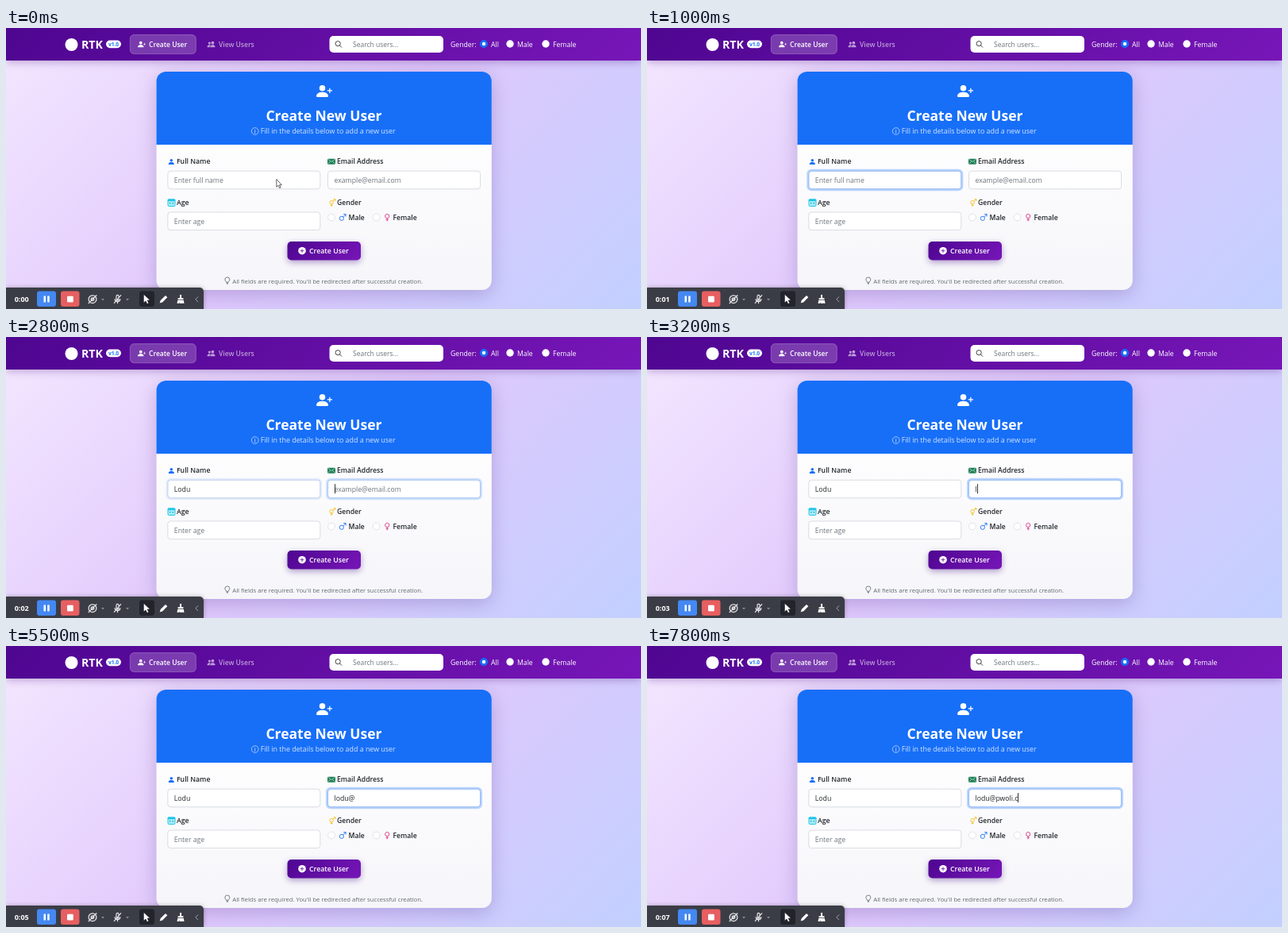
An HTML page with a canvas for the animation above (8 s loop, 800 by 354 pixels).

```html
<!DOCTYPE html>
<html lang="en">
<head>
<meta charset="utf-8">
<title>Create New User</title>
<style>
html, body { margin: 0; width: 100%; height: 100%; overflow: hidden; }
canvas { display: block; width: 800px; height: 354px; }
</style>
</head>
<body>
<canvas id="stage" width="800" height="354"></canvas>
<script>
const ctx = document.getElementById('stage').getContext('2d');
const LOOP = 8000;
const FOCUS_NAME = 300, FOCUS_MAIL = 2700;
const NAME = 'Lodu', MAIL = 'lodu@pwoli.c';
const INK = '#212529', GREY = '#6c757d', BLUE = '#176ff8', WHITE = '#fff';

// [time, characters typed, caret visible]
const nameKeys = [[300, 0, 1], [800, 0, 0], [1300, 0, 1], [1400, 1, 1], [1600, 2, 1],
  [2000, 2, 0], [2200, 3, 1], [2400, 4, 1], [2700, 4, 0]];
const mailKeys = [[2700, 0, 1], [3200, 1, 1], [3500, 2, 1], [3800, 3, 1], [4000, 3, 0],
  [4300, 4, 1], [4800, 4, 0], [5000, 5, 1], [5500, 5, 0], [6000, 5, 1], [6400, 6, 1],
  [6600, 7, 1], [6700, 8, 1], [6900, 9, 1], [7200, 10, 1], [7400, 11, 1], [7800, 12, 1]];

// Icons on a 16 unit grid
const HEAD = 'a3 3 0 1 0 0-6 3 3 0 0 0 0 6';
const ICONS = {
  person: 'M3 14s-1 0-1-1 1-4 6-4 6 3 6 4-1 1-1 1zm5-6' + HEAD,
  personPlus: 'M1 14s-1 0-1-1 1-4 6-4 6 3 6 4-1 1-1 1zm5-6' + HEAD +
    'M13 5h1v2h2v1h-2v2h-1v-2h-2v-1h2z',
  people: 'M7 14s-1 0-1-1 1-4 5-4 5 3 5 4-1 1-1 1zm4-6' + HEAD +
    'm-5.8 6A2.2 2.2 0 0 1 5 13c0-1.4.7-2.8 1.9-3.7A6 6 0 0 0 5 9c-4 0-5 3-5 4s1 1 1 1z' +
    'M4.5 8a2.5 2.5 0 1 0 0-5 2.5 2.5 0 0 0 0 5',
  search: 'M12 6.5a5.5 5.5 0 1 1-11 0 5.5 5.5 0 0 1 11 0M10.5 10.5L15.2 15.2',
  info: 'M15.5 8a7.5 7.5 0 1 1-15 0 7.5 7.5 0 0 1 15 0M8 4v1.6M6.8 7.2h1.4L7.6 12h1.4',
  male: 'M10.5 10a4.5 4.5 0 1 1-9 0 4.5 4.5 0 0 1 9 0M9.2 6.8L15 1M10 1h5v5',
  female: 'M12.5 5.2a4.5 4.5 0 1 1-9 0 4.5 4.5 0 0 1 9 0M8 9.7V16M5.3 13h5.4',
  both: 'M10.5 7.5a3.7 3.7 0 1 1-7.4 0 3.7 3.7 0 0 1 7.4 0M9.5 5L15 .8M11 .8h4v4M6.8 11.2V16M4.5 13.6h4.6',
  bulb: 'M5.5 11.5C5.5 9.5 3 8.800 3 5.800a5 5 0 0 1 10 0c0 3-2.500 3.700-2.500 5.700zM6 13.500h4M7 15.500h2',
  camera: 'M14.500 8a6.500 6.500 0 1 1-13 0 6.500 6.500 0 0 1 13 0M10.500 8a2.500 2.500 0 1 1-5 0 2.500 2.500 0 0 1 5 0M1 15L15 1',
  mic: 'M6 3a2 2 0 0 1 4 0v5a2 2 0 0 1-4 0zM3.500 7.500a4.500 4.500 0 0 0 9 0M8 12v3.500M2 15L14 1',
  arrow: 'M3 0v13.500l3.300-3 2.500 5.300 2.200-1-2.500-5.200H13z',
  pencil: 'M11.500 1l3.500 3.500L6 13.500 1 15l1.500-5z',
  stamp: 'M6.500 0h3v6h3.500v3h-10V6h3.500zM2.500 10h11l1 6h-3l-.5-3v3H6.500v-3L5.500 16h-4z',
};

function text(str, x, y, size, color, weight = 400, align = 'left') {
  ctx.font = `${weight} ${size}px "Open Sans", "Noto Sans", sans-serif`;
  ctx.textAlign = align;
  ctx.fillStyle = color;
  ctx.fillText(str, x, y);
}

function box(x, y, w, h, r, fill, stroke, line = 0.7) {
  ctx.beginPath();
  ctx.roundRect(x, y, w, h, r);
  if (fill) { ctx.fillStyle = fill; ctx.fill(); }
  if (stroke) { ctx.strokeStyle = stroke; ctx.lineWidth = line; ctx.stroke(); }
}

function disc(x, y, r, fill, stroke) {
  box(x - r, y - r, 2 * r, 2 * r, r, fill, stroke);
}

// Icon centred on x, y; a line width draws it as an outline
function icon(name, x, y, size, color, line) {
  ctx.save();
  ctx.translate(x - size / 2, y - size / 2);
  ctx.scale(size / 16, size / 16);
  const path = new Path2D(ICONS[name]);
  if (line) {
    ctx.strokeStyle = color;
    ctx.lineWidth = line;
    ctx.stroke(path);
  } else {
    ctx.fillStyle = color;
    ctx.fill(path);
  }
  ctx.restore();
}

// Gradient running at 135 degrees over a box
function diagonal(x, y, w, h, ...colors) {
  const d = (w + h) / 4, cx = x + w / 2, cy = y + h / 2;
  const g = ctx.createLinearGradient(cx - d, cy - d, cx + d, cy + d);
  colors.forEach((c, i) => g.addColorStop(i / (colors.length - 1), c));
  return g;
}

function withShadow(color, blur, dy, draw) {
  ctx.save();
  ctx.shadowColor = color;
  ctx.shadowBlur = blur;
  ctx.shadowOffsetY = dy;
  draw();
  ctx.restore();
}

function navRadio(x, label, checked) {
  disc(x, 20, 4.7, checked ? BLUE : WHITE, checked ? BLUE : null);
  if (checked) disc(x, 20, 2.2, WHITE);
  text(label, x + 9, 23.5, 8.7, WHITE);
}

function navbar() {
  withShadow('rgba(60,10,110,.3)', 10, 2, () =>
    box(0, 0, 800, 41, 0, diagonal(0, 0, 800, 41, '#4e0690', '#7716b8')));
  disc(82.5, 21, 8, WHITE);
  text('RTK', 95, 26, 14.2, WHITE, 700);
  box(126, 15.5, 19, 9.7, 4.9, WHITE);
  text('v1.0', 135.5, 22.7, 6.6, BLUE, 700, 'center');
  box(156.3, 8.600, 83, 24, 5, 'rgba(255,255,255,.2)', 'rgba(255,255,255,.35)');
  icon('personPlus', 171, 20.5, 10, WHITE);
  text('Create User', 180, 23.7, 8.5, WHITE, 600);
  icon('people', 258.500, 20.5, 10, 'rgba(255,255,255,.6)');
  text('View Users', 268, 23.7, 8.5, 'rgba(255,255,255,.6)', 600);
  box(407.500, 10, 143.500, 21, 5, WHITE);
  icon('search', 419, 20.5, 9, INK, 1.5);
  text('Search users...', 437, 23.7, 8.5, GREY);
  text('Gender:', 560, 23.5, 8.7, WHITE);
  navRadio(602, 'All', true);
  navRadio(635, 'Male');
  navRadio(680, 'Female');
}

function card() {
  const fill = ctx.createLinearGradient(0, 147, 0, 330);
  fill.addColorStop(0, '#fdfdfe');
  fill.addColorStop(1, '#f6f6fa');
  withShadow('rgba(80,50,140,.28)', 24, 6, () => box(189.500, 55, 422.300, 275, 12, fill));
  box(189.500, 55, 422.300, 92, [12, 12, 0, 0], BLUE);
  icon('personPlus', 401, 79.5, 20, WHITE);
  text('Create New User', 400.500, 116.500, 17.5, WHITE, 700, 'center');
  icon('info', 313.700, 130, 9.300, '#d3e4fe', 1.2);
  text('Fill in the details below to add a new user', 320.700, 133.300, 8.9, '#d3e4fe');
}

function labels() {
  icon('person', 208.3, 168.5, 9.500, BLUE);
  text('Full Name', 215, 171.300, 8.7, INK, 600);

  box(405, 164.700, 10, 7, 1, '#1d7f55');
  ctx.strokeStyle = '#cfe6da';
  ctx.lineWidth = 0.7;
  ctx.stroke(new Path2D('M405.500 165.300l4.500 3.200 4.500-3.200M405.500 171.300l3-3.200M414.500 171.300l-3-3.200'));
  text('Email Address', 417, 171.300, 8.65, INK, 600);

  box(204, 216, 9, 8.500, 1.3, '#a9eefb', '#20c5e8', 1);
  box(203.700, 215.500, 9.600, 2.800, 1, '#20c5e8');
  box(206, 220, 1.400, 1.400, 0, '#2a9fb8');
  box(209.500, 220, 1.400, 1.400, 0, '#2a9fb8');
  text('Age', 215, 223, 8.7, INK, 600);

  icon('both', 410.800, 220, 9.500, '#f5b90b', 1.4);
  text('Gender', 417, 223, 8.65, INK, 600);

  disc(410, 238.500, 4.400, WHITE, '#d3d7dc');
  icon('male', 424, 238.700, 9.300, BLUE, 1.5);
  text('Male', 431.500, 242, 8.65, INK, 600);
  disc(466.500, 238.500, 4.400, WHITE, '#d3d7dc');
  icon('female', 480.200, 238.700, 9.300, '#d63384', 1.5);
  text('Female', 487.500, 242, 8.65, INK, 600);
}

function field(x, y, value, hint, focus = 0, caret = false) {
  if (focus > 0) box(x - 1.2, y - 1.2, 194.400, 25, 4.5, null, `rgba(13,110,253,${0.28 * focus})`, 2.6);
  box(x, y, 192, 22.600, 3.5, WHITE, '#cfd4da', 0.8);
  if (focus > 0) box(x, y, 192, 22.600, 3.5, null, `rgba(134,183,254,${focus})`, 0.9);
  text(value || hint, x + 8, y + 14.700, 8.7, value ? INK : GREY);
  if (caret) {
    const cx = Math.round(x + 8 + (value ? ctx.measureText(value).width : 0));
    ctx.fillStyle = '#000';
    ctx.fillRect(cx, y + 5, 0.8, 12);
  }
}

function submitButton() {
  withShadow('rgba(70,20,130,.4)', 8, 3, () =>
    box(354.500, 269, 92.500, 23.500, 5, diagonal(354, 269, 93, 24, '#4e0690', '#7716b8')));
  disc(373, 280.700, 4.800, WHITE);
  ctx.fillStyle = '#5c0c9f';
  ctx.fillRect(370.600, 280.300, 4.800, 0.8);
  ctx.fillRect(372.600, 278.300, 0.8, 4.800);
  text('Create User', 382, 284, 8.8, WHITE, 600);
  icon('bulb', 278.800, 318.200, 9.500, '#4d5359', 1.2);
  text("All fields are required. You'll be redirected after successful creation.",
    285.300, 321.500, 7.69, '#62686f');
}

function caretDown(x) {
  ctx.fillStyle = '#888b94';
  ctx.fill(new Path2D(`M${x - 2} 341h4l-2 2.500z`));
}

function recorder(seconds) {
  withShadow('rgba(0,0,0,.3)', 5, 0, () => box(0, 327, 249, 28, [0, 5, 0, 0], '#3b3d46'));
  text('0:0' + seconds, 10.700, 345, 9, WHITE, 700);
  box(39, 331.500, 24, 19.500, 3, '#4488f2');
  box(47.500, 337.500, 2.500, 8, 0.5, WHITE);
  box(52.200, 337.500, 2.500, 8, 0.5, WHITE);
  box(69, 331.500, 23.500, 19.500, 3, '#e75f60');
  box(77, 337.700, 7.800, 7.800, 1.2, WHITE);
  icon('camera', 109, 341.700, 12, '#e6e7ea', 1.7);
  caretDown(122);
  icon('mic', 140.500, 341.700, 12, '#e6e7ea', 1.6);
  caretDown(153);
  box(168, 331.500, 19, 19.500, 3, '#22242b');
  icon('arrow', 177.300, 341.700, 11.500, WHITE);
  icon('pencil', 198.500, 341.700, 11, WHITE);
  icon('stamp', 220, 341.500, 11, WHITE);
  ctx.strokeStyle = '#a3a5ad';
  ctx.lineWidth = 1;
  ctx.stroke(new Path2D('M242 338.500l-3.200 3.300 3.200 3.300'));
}

function pointer() {
  const path = new Path2D('M340.800 190.500v9.800l2.200-2 1.700 3.400 1.400-.7-1.600-3.300h2.800z');
  ctx.fillStyle = WHITE;
  ctx.fill(path);
  ctx.strokeStyle = '#222';
  ctx.lineWidth = 0.7;
  ctx.stroke(path);
}

const stateAt = (keys, t) => keys.filter(k => k[0] <= t).pop() || [0, 0, 0];
const ramp = (t, start) => Math.min(1, Math.max(0, (t - start) / 150));

function render(now) {
  const t = now % LOOP;
  const [, nameCount, nameCaret] = stateAt(nameKeys, t);
  const [, mailCount, mailCaret] = stateAt(mailKeys, t);
  const mailFocus = ramp(t, FOCUS_MAIL);

  box(0, 0, 800, 354, 0, diagonal(0, 0, 800, 354, '#f4e7ff', '#e0c8fc', '#c2d0ff'));
  navbar();
  card();
  labels();
  field(203.800, 180.200, NAME.slice(0, nameCount), 'Enter full name', ramp(t, FOCUS_NAME) - mailFocus, nameCaret);
  field(405.500, 180.200, MAIL.slice(0, mailCount), 'example@email.com', mailFocus, mailCaret);
  field(203.800, 232, '', 'Enter age');
  submitButton();
  recorder(Math.floor(t / 1000));
  if (t < FOCUS_NAME) pointer();
}

const start = performance.now();
function tick() {
  render(performance.now() - start);
  requestAnimationFrame(tick);
}
tick();
</script>
</body>
</html>
```
